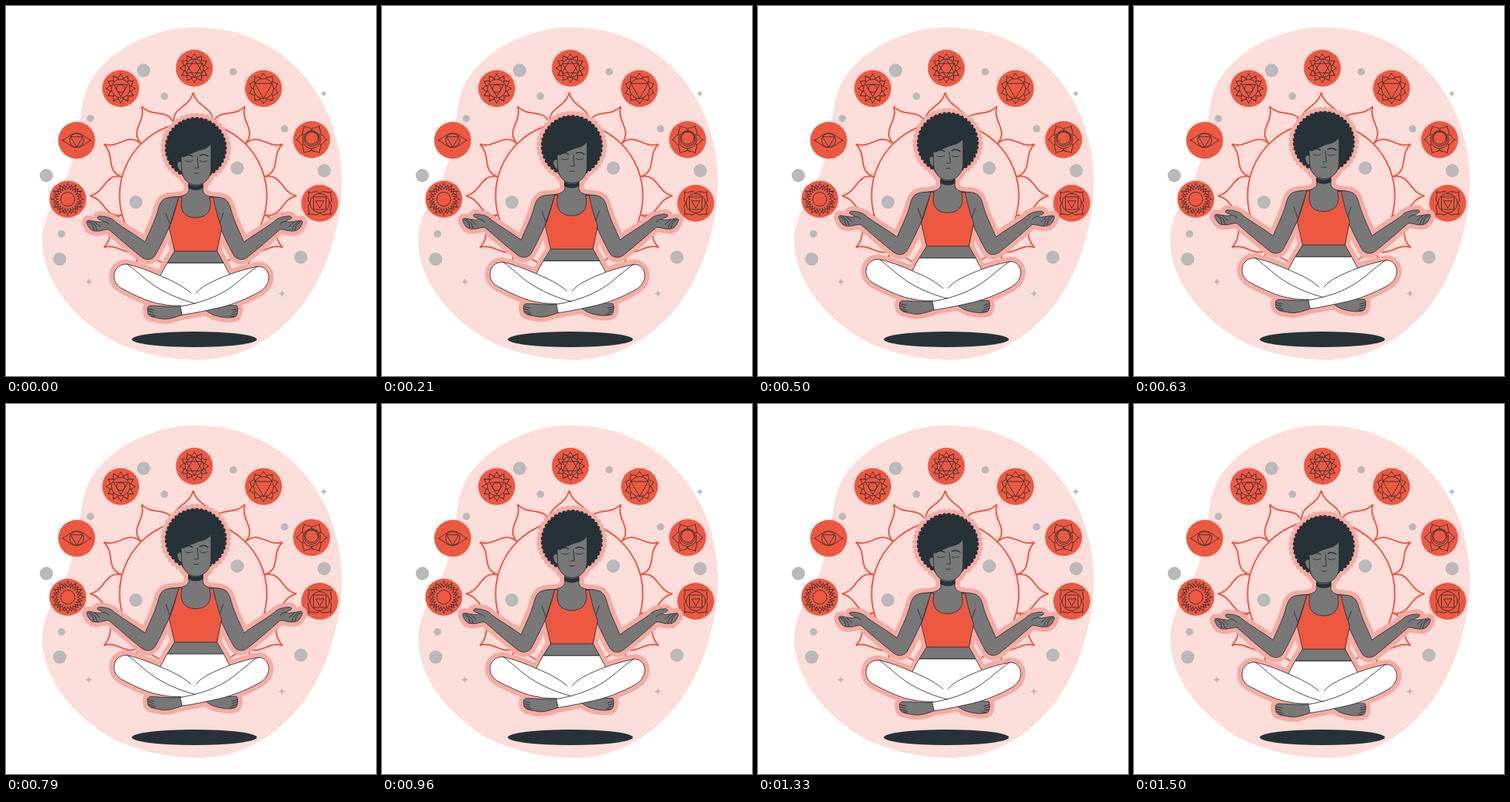
Write an HTML page that moves like this. It is 500 px wide and 500 px high and loops after 1.54 s.

```html
<!DOCTYPE html>
<html lang="en">
<head>
<meta charset="utf-8">
<style>
  html, body { margin: 0; width: 100%; height: 100%; overflow: hidden; background: #fff; }
  svg { display: block; width: 100%; height: 100%; }
  .halo { --ink: #f7aaa0; --dark: #f7aaa0; --skin: #f7aaa0; --top: #f7aaa0; --white: #f7aaa0; --w: 13; --curl: 6.5; --r: 44.5px; }
  #body { stroke: var(--ink, #263238); stroke-width: var(--w, .9); stroke-linejoin: round; stroke-linecap: round; }
  .dark { fill: var(--dark, #263238); }
  .skin { fill: var(--skin, #787878); }
  .top { fill: var(--top, #ee5841); }
  .white { fill: var(--white, #fff); }
  .line { fill: none; }
  .curls { fill: none; r: var(--r, 39px); stroke: var(--dark, #263238); stroke-width: var(--curl, 6); stroke-dasharray: 0 6; }
  #dots, #sparkles { fill: #b9b9b9; }
  #lotus { fill: none; stroke: #ee5841; stroke-width: 2; }
  #chakras { fill: none; stroke: #263238; stroke-width: .9; stroke-linejoin: round; }
  .disc { fill: #ee5841; stroke: none; }
</style>
</head>
<body>
<svg viewBox="0 0 500 500">
  <defs>
    <g id="arm">
      <path class="skin" d="M222 258.500C212 259.500 208 264 205 277C200 294 193 306 188 319C175 309 160 301 148 292C143 286 134 284 126 284C122 285 123 288 128 289C132 290 130 292 126 292L113 290C109 289 108 292 110 295C112 300 115 304 121 304C128 305 134 301 139 302C155 316 170 329 184 340C190 344 197 343 201 338C208 326 214 313 220 300L234 258Z"/>
      <path class="line" d="M216 280L221 294M111 291L117 296L119 303M114 291L121 297L123 303M120 292L127 298M131 291C135 291 138 293 139 295"/>
    </g>
    <g id="body">
      <circle class="dark" cx="256.5" cy="192" r="39"/>
      <circle class="curls" cx="256.5" cy="192" pathLength="246"/>
      <path class="skin" d="M247 234V250C244 257 234 258 222 258.500V290L228 331L218 347H294L285 331L291 290L287 258.500C276 258 268 257 266 250V234Z"/>
      <use href="#arm"/>
      <use href="#arm" transform="matrix(-1 0 0 1 509.5 0)"/>
      <path class="top" d="M233.500 258L238 258.500C234 275 240 286 256 286C273 286 279 275 275 259L280 258.500C283 275 287 288 291.500 300L285 331.300H228L220.500 300C225 288 230 272 233.500 258Z"/>
      <path class="dark" d="M247 241Q256.500 246 266 241V246Q256.500 251 247 246Z"/>
      <path class="skin" d="M238 211C233 208 230 212 232 217C233 221 235 224 239 223Z"/>
      <path class="skin" d="M237 204C246 202 256 196 263 194.500C270 193 275 190 277 185V222C276 234 267 242 257 242C246 242 238 233 237.500 222Z"/>
      <path class="line" d="M258.500 204L260 219H255M254 226H260M242 209Q247 212 252 209M262 209Q267 212 272 209"/>
      <path class="line" d="M240 204Q246 199 252 203M262 202Q268 199 273 203" style="stroke-width:var(--w,1.5)"/>
      <path class="skin" d="M237 406C222 407 207 405 195 405C190 406 191 411 192 416C194 420 200 421 207 422C217 425 228 421 239 417Z"/>
      <path class="line" d="M192 409L200 411M192 412L199 414M193 416L200 417M196 419L202 419"/>
      <path class="skin" d="M268 410L297 403C302 406 307 404 312 405C314 409 313 416 311 419C305 423 289 421 279 417Z"/>
      <path class="line" d="M313 409L305 411M313 412L306 414M312 416L305 417M309 420L303 419"/>
      <path class="white" d="M218 347.300H294L304 366L290 398H220L208 366Z"/>
      <g stroke="none">
        <path class="white" d="M250 388C242 381 231 374 214 367C200 361 185 354 164 349C153 348 146 356 146 365C146 373 150 378 157 382C176 392 195 401 211 403C220 405 228 405 236 405L260 403L290 395Z"/>
        <path class="white" d="M340 352C350 351 356 360 355 369C354 377 349 382 343 386C325 396 307 403 291 407C273 411 256 415 238 417.500L235.500 406L256 402L250 388H257C261 383 266 379 274 375C291 366 315 357 340 352Z"/>
      </g>
      <path class="line" d="M250 388C242 381 231 374 214 367C200 361 185 354 164 349C153 348 146 356 146 365C146 373 150 378 157 382C176 392 195 401 211 403C220 405 228 405 236 405M164 349C178 359 191 373 207 382C222 391 240 398 256 402"/>
      <path class="line" d="M257 388C261 383 266 379 274 375C291 366 315 357 340 352C350 351 356 360 355 369C354 377 349 382 343 386C325 396 307 403 291 407C273 411 256 415 238 417.500L235.500 406C275 399 298 387 319 368C327 362 333 356 340 352"/>
    </g>
  </defs>
  <path fill="#fbddd9" d="M257 29C190 28 120 70 106 122C98 150 100 187 86 220C75 255 49 279 49 318C49 370 92 425 150 455C195 475 240 479 265 478C325 476 370 444 402 402C437 355 454 290 454 232C451 165 426 113 384 75C346 43 302 29 257 29Z"/>
  <g id="lotus" transform="translate(253 256.500)"></g>
  <g id="dots"></g>
  <g id="sparkles"></g>
  <g id="chakras"></g>
  <ellipse cx="254.500" cy="450.500" rx="84.500" ry="10.500" fill="#263238"/>
  <g id="figure">
    <use href="#body" class="halo"/>
    <use href="#body"/>
  </g>
</svg>
<script>
const $ = id => document.getElementById(id);
const circle = (r, y = 0) => `<circle cy="${y}" r="${r}"/>`;

// n pointed petals from radius r out to radius R
function petals(n, r, R, turn = 0) {
  const w = r * Math.sin(Math.PI / n), h = r * Math.cos(Math.PI / n);
  const a = -(h + .55 * (R - h)), b = -(h + .52 * (R - h));
  const d = `M${-w} ${-h}C${-w * 1.2} ${a} ${-w * .17} ${b} 0 ${-R}C${w * .17} ${b} ${w * 1.2} ${a} ${w} ${-h}`;
  return Array.from({ length: n }, (_, i) =>
    `<path d="${d}" transform="rotate(${turn + i * 360 / n})"/>`).join('');
}

function polygon(n, r, turn = 0) {
  const points = Array.from({ length: n }, (_, i) => {
    const a = (turn + i * 360 / n) * Math.PI / 180;
    return [r * Math.sin(a), -r * Math.cos(a)];
  });
  return `<polygon points="${points.join(' ')}"/>`;
}

$('lotus').innerHTML = circle(99.5) + petals(12, 99.5, 139.5);

$('dots').innerHTML = [
  [186, 87, 9], [307, 89, 5], [214, 122, 5], [114, 152, 5], [54.5, 229, 9], [175.5, 265, 9],
  [75, 308, 5], [72.5, 342, 9], [312.5, 219, 9], [376.5, 166, 5], [430, 222.5, 9], [398.5, 339.5, 9]
].map(([x, y, r]) => `<circle cx="${x}" cy="${y}" r="${r}"/>`).join('');

$('sparkles').innerHTML = [[112, 372.5], [373, 388.5], [429.5, 118.5]].map(([x, y]) =>
  `<path d="M${x} ${y - 5}q.7 4.300 5 5q-4.300 .7 -5 5q-.7-4.300-5-5q4.300-.7 5-5"/>`).join('');

const eye = '<path d="M-20 0C-13-2-9-9.500 0-9.500S13-2 20 0C13 2 9 9.500 0 9.500S-13 2-20 0Z"/>';
$('chakras').innerHTML = [
  [155, 111.5, petals(12, 13, 20) + circle(12.5) + polygon(3, 11, 180) + circle(5.5)],
  [254.5, 84, petals(12, 13, 19.5) + circle(12.5) + polygon(3, 12.5) + polygon(3, 12.5, 180)],
  [348, 111.5, petals(10, 14, 20.5) + circle(13.5) + polygon(3, 13.5, 180)],
  [95.5, 181.5, eye + circle(9.5) + polygon(3, 9.5, 180)],
  [413, 180.5, petals(6, 13, 21, 30) + circle(12) + circle(10, -1) + circle(8.5, -2)],
  [83.5, 261, petals(12, 13, 22) + petals(12, 13, 20, 15) + circle(9.5)],
  [424, 266.5, petals(4, 13, 22, 45) + circle(13) + polygon(4, 12, 45) + polygon(3, 6.5, 180)]
].map(([x, y, symbol]) =>
  `<g transform="translate(${x} ${y})"><circle class="disc" r="25"/>${symbol}</g>`).join('');

// Linear float up and down in 1.5 s, stepped at 24 fps
const LOOP = 1540, STEP = 1000 / 24, STEPS = 36, RISE = 10;

function draw() {
  const step = Math.min(STEPS, Math.floor((performance.now() % LOOP + 2) / STEP));
  const lift = RISE * (1 - Math.abs(step / STEPS * 2 - 1));
  $('figure').setAttribute('transform', `translate(0 ${-lift})`);
  requestAnimationFrame(draw);
}
draw();
</script>
</body>
</html>
```
